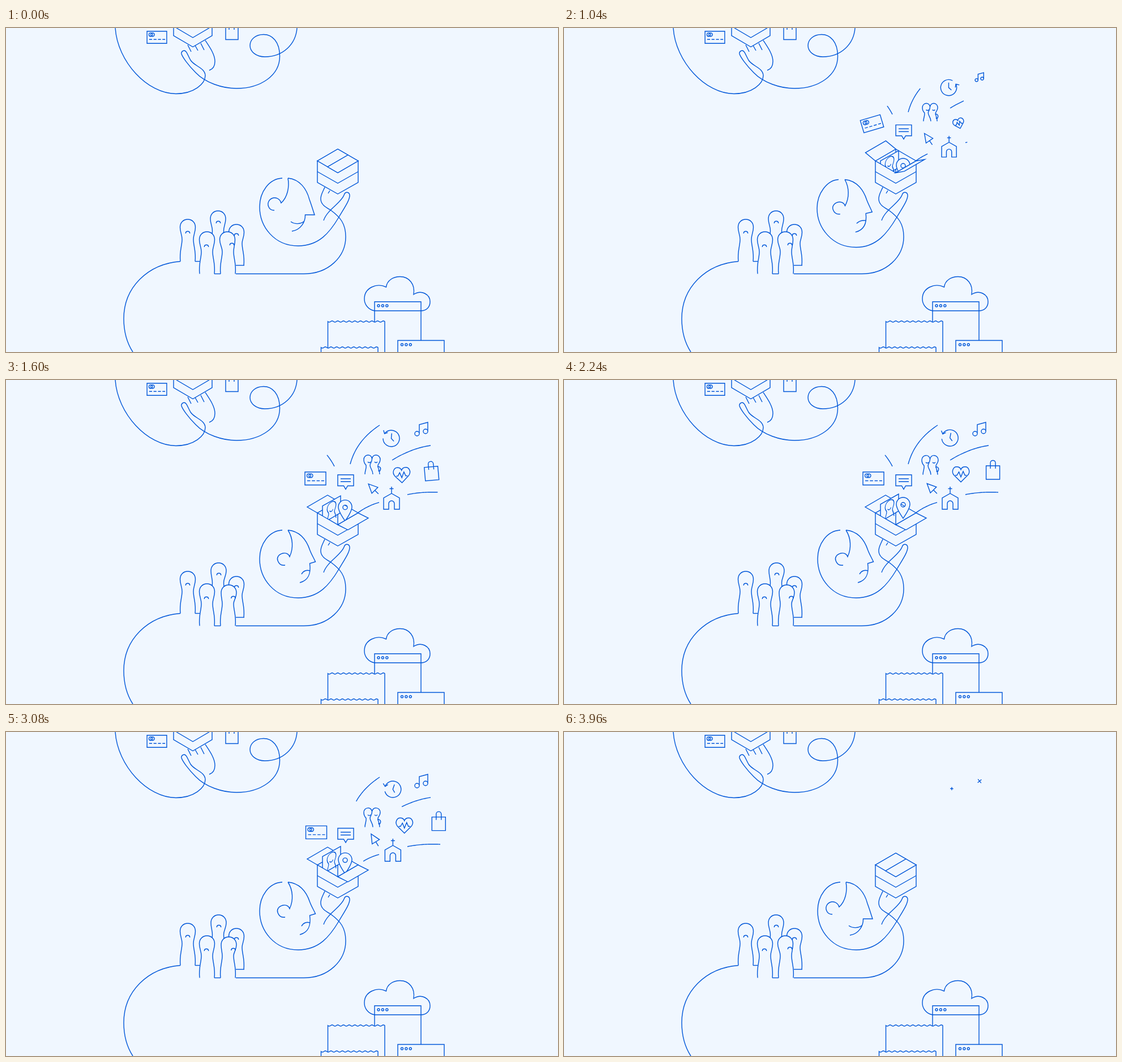
An HTML page with a canvas for the animation above (4000 ms loop, 975x574 px).

```html
<!DOCTYPE html>
<html lang="en">
<head>
<meta charset="utf-8">
<title>Box of ideas</title>
<style>
html, body { margin: 0; width: 100%; height: 100%; overflow: hidden; background: #f0f7ff; }
canvas { display: block; }
</style>
</head>
<body>
<canvas id="stage" width="975" height="574"></canvas>
<script>
const ctx = document.getElementById('stage').getContext('2d');
const LOOP = 4000, BG = '#f0f7ff', INK = '#0057d9', WEIGHT = 1.4;

const clamp = u => Math.max(0, Math.min(1, u));
const ramp = (t, a, b) => clamp((t - a) / (b - a));
const smooth = (t, a, b) => { const u = ramp(t, a, b); return u * u * (3 - 2 * u); };
const easeOut = (t, a, b) => 1 - (1 - ramp(t, a, b)) ** 3;
const rad = deg => deg * Math.PI / 180;

function draw(d, fill) {
  const p = new Path2D(d);
  if (fill) ctx.fill(p);
  ctx.stroke(p);
}

function mixPath(from, to, s) {
  const end = to.match(/-?[\d.]+/g);
  let i = 0;
  return from.replace(/-?[\d.]+/g, n => +n + (end[i++] - n) * s);
}

const poly = (...pts) => 'M' + pts.map(p => p.join(' ')).join('L') + 'Z';
const ring = (x, y, r) => `M${x + r} ${y}a${r} ${r} 0 1 0 ${-2 * r} 0a${r} ${r} 0 1 0 ${2 * r} 0`;
const dots = (x, y) => ring(x, y, 2) + ring(x + 7.4, y, 2) + ring(x + 14.8, y, 2);
const torn = 'q2.5 2.2 5 0q2.5 -2.2 5.05 0'.repeat(10);

// ---- still scenery ----
const loopLine = 'M193 0C197 60 250 116.5 300 116.5C332 116.5 352 99 352 84C351 70 333 68 326 57' +
  'C322 50 320 44 318 42C315 38 309 41 310 46C312 52 322 66 335 79C352 97 382 107 407 107' +
  'C450 107 483.5 84 483.5 50C483.5 24 470 11.5 455 11.5C440 11.5 431 21 431 31C431 42 442 51 457 51C490 51 512 28 514 0';
const topHand = 'M321 30L327 42M334 31L339 40M344 27L350 39M352 22C360 34 369 47 369 59C369 68 365 73 359 75';
const topBox = 'M296 0V13.5L330 33.5L364 13.5V0M301 0L330 17L359 0';
const arm = 'M406 435.5H526C570 435.5 600 405 600 370C600 346 590 335 574 323C566 318 557 314 556 304C555 296 560 290 563 282M572 288L569 293';
const road = 'M308 413.5C250 418 208 460 208 515C208 540 215 560 224 574';
const cloud = 'M651 501C640 499 633 490 633 480C633 460 655 451 671.5 459C673 447 684 440.5 696 440.5' +
  'C712 440.5 723 454 720 472C734 463 749 472 749 485C749 495 742 501 733 501';

function scenery() {
  draw(loopLine);
  draw(topHand);
  draw(topBox);
  draw('M388 0V20.5H410V0M394 0V3M403 0V3');
  at(266.5, 16.5, 0.94, 0, card);
  draw(road);
  draw(cloud);
  draw('M651 574V485H733V574M651 501H733' + dots(658, 492));
  draw('M692 574V553.5H774V574' + dots(699.5, 561), true);
  draw(`M568.5 574V520${torn}V574`, true);
  draw(`M556.5 574V566${torn}V574`, true);
}

// ---- crowd ----
function pawn(x, top, bottom, lean, mx, my) {
  const h = x + lean, neck = bottom - 39;
  draw(`M${x - 13} ${bottom}C${x - 15} ${bottom - 18} ${x - 10} ${bottom - 27} ${x - 10} ${neck}` +
    `C${x - 10} ${top + 27} ${h - 13.5} ${top + 23} ${h - 13.5} ${top + 14}` +
    `C${h - 13.5} ${top + 6} ${h - 8} ${top} ${h} ${top}C${h + 8} ${top} ${h + 13.5} ${top + 6} ${h + 13.5} ${top + 14}` +
    `C${h + 13.5} ${top + 23} ${x + 10} ${top + 27} ${x + 10} ${neck}` +
    `C${x + 10} ${bottom - 27} ${x + 15} ${bottom - 18} ${x + 13} ${bottom}`, true);
  draw(`M${h + mx - 3.7} ${top + my + 2}c0 -5 7.4 -5 7.4 0`);
}

function crowd(t) {
  const lean = smooth(t, 1060, 1500) - smooth(t, 3520, 3900);
  pawn(321, 339, 413.5, 0, 0, 23);
  draw('M334 413.5H342');
  pawn(374.5, 324, 398, lean, 0.5, 20);
  pawn(407, 348, 420.5, 0, 0, 18);
  draw('M406 420.5H421');
  pawn(355, 361, 435.5, 0, -1, 25);
  draw('M368 435.5H379');
  pawn(392, 361 + 2 * lean, 435.5, -1 + 2.5 * lean, 8, 22);
}

// ---- holder ----
const calm = 'M498 266C519 268 531 285 536 304C540 315 542 322 545 331L528.5 331C529 344 520 358 505 360' +
  'M498 266C501 282 497 300 486 310C484 303 478 300 472 301C464 303 461 311 464 317C466 322 470 323 474 323' +
  'M503 343C510 348 520 348 527 342';
const awed = 'M498 266C521 268 532 287 537 302C540 310 544 316 546.5 322L536.5 325C539 344 534 355 519 359' +
  'M498 266C507 280 508 298 501 313C499 307 493 306 489 307C481 309 478 315 480 320C482 326 486 329 493 328' +
  'M522 344C525 338 531 336 537 338';

function holder(t) {
  const s = smooth(t, 700, 1160) - smooth(t, 3120, 3560);
  const b = smooth(t, 660, 1000) - smooth(t, 1060, 1450);
  const dy = 2.5 * b;
  draw(arm);
  draw(`M${488 - 3 * b} ${266 + dy}C465 ${267 + dy} ${448 - b} ${290 + dy} ${448 - b} ${317 + dy}` +
    `C${448 - b} ${352 + dy} 474 ${386 + dy} 516 ${386 + dy}C553 ${386 + dy} 572 362 588 335` +
    'C598 318 607 305 607 297C607 290 599 289 597 296C592 310 567 322 561 341');
  ctx.save();
  ctx.translate(-2 * b, dy);
  draw(mixPath(calm, awed, s));
  ctx.restore();
}

// ---- box ----
function flap(p, q, dir, deg) {
  const c = Math.cos(rad(deg)), s = Math.sin(rad(deg));
  const dx = 18 * dir * c, dy = 10.5 * dir * c - 21 * s;
  draw(poly(p, [p[0] + dx, p[1] + dy], [q[0] + dx, q[1] + dy], q), true);
}

function contents(t) {
  const rise = 1 - easeOut(t, 700, 2400);
  const photoY = 30 * rise - 4 + 40 * smooth(t, 3060, 3350);
  const pinY = 45 * rise - 5 + 45 * smooth(t, 3000, 3350);
  ctx.save();
  ctx.clip(new Path2D('M549 100V235L586 256L623 235V100Z'));
  draw('M586 214V256');
  ctx.save();
  ctx.translate(0, photoY);
  draw('M559 224L591 206V236L559 255Z', true);
  ctx.transform(0.87, -0.47, 0, 1, 575, 227);
  draw('M-9 22C-9 14 -5 12 -6 7C-8 4 -9 2 -9 -1C-9 -13 9 -13 9 -1C9 3 7 5 6 8C5 12 9 14 9 22M-4 4q4 5 7 0');
  ctx.restore();
  ctx.translate(0, pinY);
  draw('M599 250C592 240 587 232 587 225A12 12 0 0 1 611 225C611 232 606 240 599 250Z' + ring(599, 226, 4), true);
  ctx.restore();
}

function box(t) {
  const shut = smooth(t, 3100, 3440);
  const left = 180 * (smooth(t, 620, 1120) - shut);
  const right = 176 * (smooth(t, 640, 1180) - shut);
  const drawLeft = () => flap([550, 235.5], [586, 214.5], 1, left);
  draw('M550 235.5L586 214.5L622 235.5L586 256.5Z', true);
  if (left > 90) drawLeft();
  if (left > 1) contents(t);
  if (left <= 90) drawLeft();
  draw('M550 235.5L586 256.5L622 235.5V273.5L586 294L550 273.5Z', true);
  draw('M550 254.5L586 275L622 254.5');
  flap([586, 256.5], [622, 235.5], -1, right);
}

// ---- flying icons ----
function card() {
  draw('M-18.5 -11.5H18.5V11.5H-18.5Z' + ring(-11.5, -5, 3.4) + ring(-8, -5, 3.4));
  ctx.setLineDash([5.5, 2.8]);
  draw('M-14.5 4H15.5');
  ctx.setLineDash([]);
}
const chat = () => draw('M-14 -12.5H14V7H3.5L0 13L-3.5 7H-14ZM-9 -5.5H9M-9 -0.5H9');
const cursor = () => draw('M0 -12.5L-7.5 3.5H7.5ZM0 3.5V12.5');
const couple = () => draw('M-13 17C-13 10 -10 7 -11 1C-14 -2 -15 -5 -15 -9C-15 -19 -1 -20 -.5 -10' +
  'C0 -20 14 -19 14 -9C14 -4 11 -2 10 1C9 5 13 9 13 17M-.5 -10C-1 -4 -4 -2 -4 1C-4 7 1 9 1 17' +
  'M9 4C13 2 16 6 14 10C13 13 11 12 11 10M-8 -5q2.5 3 5 0M4 -5q2.5 3 5 0');
const church = () => draw('M-14 17V-3L0 -11L14 -3V17H5V7a5 5 0 0 0 -10 0V17ZM0 -11V-23M-3.5 -19.5H3.5');
const heart = () => draw('M0 14L-12 2C-18 -5 -13 -13 -7.5 -13C-4 -13 -1 -11 0 -8C1 -11 4 -13 7.5 -13C13 -13 18 -5 12 2Z' +
  'M-10 2H-7L-3.5 -4L0 5L4 -5L7 2H10');
const note = () => draw('M-4 8V-8L11 -12V4' + ring(-8, 8, 4) + ring(7, 4, 4));
const bag = () => draw('M-12 -12H12V12H-12ZM-4.5 -7V-17C-4.5 -23 4.5 -23 4.5 -17V-7');

function clock(t) {
  const turn = -145 + 176 * (1 - smooth(t, 700, 1600)) - 15 * ramp(t, 1600, 3080) - 100 * smooth(t, 3080, 3480);
  ctx.save();
  ctx.rotate(rad(turn));
  ctx.beginPath();
  ctx.arc(0, 0, 14.5, 0, rad(325));
  ctx.stroke();
  draw('M11 5L14.5 0L19.5 4');
  ctx.restore();
  ctx.rotate(rad(22 * ramp(t, 1040, 3480)));
  draw('M0 -9V0L5 4.5');
}

// x, y: place at 1600 ms; dx, dy: drift until 3480 ms; ox, oy, turn: entry offset; spin, drop: exit
const icons = [
  { art: card, x: 546.5, y: 174.5, dx: 0, dy: 0, ox: -4, oy: -8, turn: -27, in: 660, out: 3080, gone: 3260, drop: 11, side: 5 },
  { art: chat, x: 600, y: 180.5, dx: 0, dy: 0, ox: 0, oy: 6, in: 640, out: 3490, gone: 3680, drop: 8 },
  { art: cursor, x: 649, y: 193, dx: 3, dy: -2, ox: -7, oy: 5, rot: -45, turn: 16, spin: 46, in: 680, out: 3400, gone: 3680 },
  { art: couple, x: 647, y: 150, dx: 0, dy: 2, ox: 0, oy: 0, in: 745, out: 3400, gone: 3680 },
  { art: church, x: 681, y: 212, dx: 3, dy: 0, ox: 0, oy: 1, in: 745, out: 3160, gone: 3390, cy: -19 },
  { art: clock, x: 680.5, y: 103.5, dx: 3.5, dy: -2.5, ox: 0, oy: 2, in: 690, out: 3490, gone: 3740 },
  { art: heart, x: 699, y: 168, dx: 6, dy: -3.5, ox: 0, oy: 0, turn: -18, in: 890, out: 3250, gone: 3620 },
  { art: note, x: 734, y: 87, dx: 0, dy: 0, ox: 0, oy: 0, in: 890, out: 3410, gone: 3800 },
  { art: bag, x: 752.5, y: 165, dx: 15, dy: -3, ox: -2, oy: 2, turn: -13, in: 1080, out: 3160, gone: 3370, cy: -4 }
];

function at(x, y, s, deg, art, t) {
  ctx.save();
  ctx.translate(x, y);
  ctx.rotate(rad(deg));
  ctx.scale(s, s);
  ctx.lineWidth = WEIGHT / s;
  art(t);
  ctx.restore();
}

function spark(x, y, t, start) {
  const u = (t - start) / 280;
  if (u <= 0 || u >= 1) return;
  const r = 4.5 * Math.sin(Math.PI * u);
  at(x, y, 1, 45 + 50 * ramp(u, 0.55, 0.8), () => draw(`M${-r} 0H${r}M0 ${-r}V${r}`));
}

function icon(o, t) {
  if (t <= o.in) return;
  const drift = (t - 1600) / 1880;
  const enter = 1 - smooth(t, o.in, o.in + 900);
  const leave = smooth(t, 2850, 3480);
  const x = o.x + o.dx * drift + o.ox * enter + (o.side || 0) * leave;
  const y = o.y + o.dy * drift + o.oy * enter + (o.drop || 0) * leave;
  const s = easeOut(t, o.in, o.in + 500) * (1 - ramp(t, o.out, o.gone) ** 1.4);
  const deg = (o.rot || 0) + (o.turn || 0) * enter + (o.spin || 0) * leave;
  if (s > 0.02) at(x, y, s, deg, o.art, t);
  spark(x, y + (o.cy || 0), t, o.gone);
  if (o.art === church) spark(x + 11, y + 11, t, 3260);
}

// ---- speed lines: curve points, then draw-on and wipe-off times ----
const streaks = [
  { c: [580, 153, 575, 143, 567, 133], on: [840, 1390], off: [2400, 3000] },
  { c: [608, 149, 619, 107, 660, 80], on: [900, 1500], off: [2240, 3700] },
  { c: [682, 142, 716, 121, 750, 116], on: [960, 1560], off: [2700, 3460] },
  { c: [709, 203, 736, 197.5, 767, 199], on: [1020, 2020], off: [3080, 3440] },
  { c: [622, 235, 640, 222, 659, 217], on: [900, 1500], off: [2700, 3460] }
];

function streak({ c, on, off }, t) {
  const b = easeOut(t, ...on), a = ramp(t, ...off) ** 2;
  if (b <= a) return;
  ctx.beginPath();
  for (let i = 0; i <= 24; i++) {
    const u = a + (b - a) * i / 24, v = 1 - u;
    const pos = k => v * v * c[k] + 2 * u * v * c[k + 2] + u * u * c[k + 4];
    ctx.lineTo(pos(0), pos(1));
  }
  ctx.stroke();
}

function frame(now) {
  const t = now % LOOP;
  ctx.fillStyle = BG;
  ctx.strokeStyle = INK;
  ctx.lineWidth = WEIGHT;
  ctx.fillRect(0, 0, 975, 574);
  scenery();
  crowd(t);
  holder(t);
  streaks.forEach(s => streak(s, t));
  box(t);
  icons.forEach(o => icon(o, t));
  requestAnimationFrame(frame);
}
requestAnimationFrame(frame);
</script>
</body>
</html>
```
